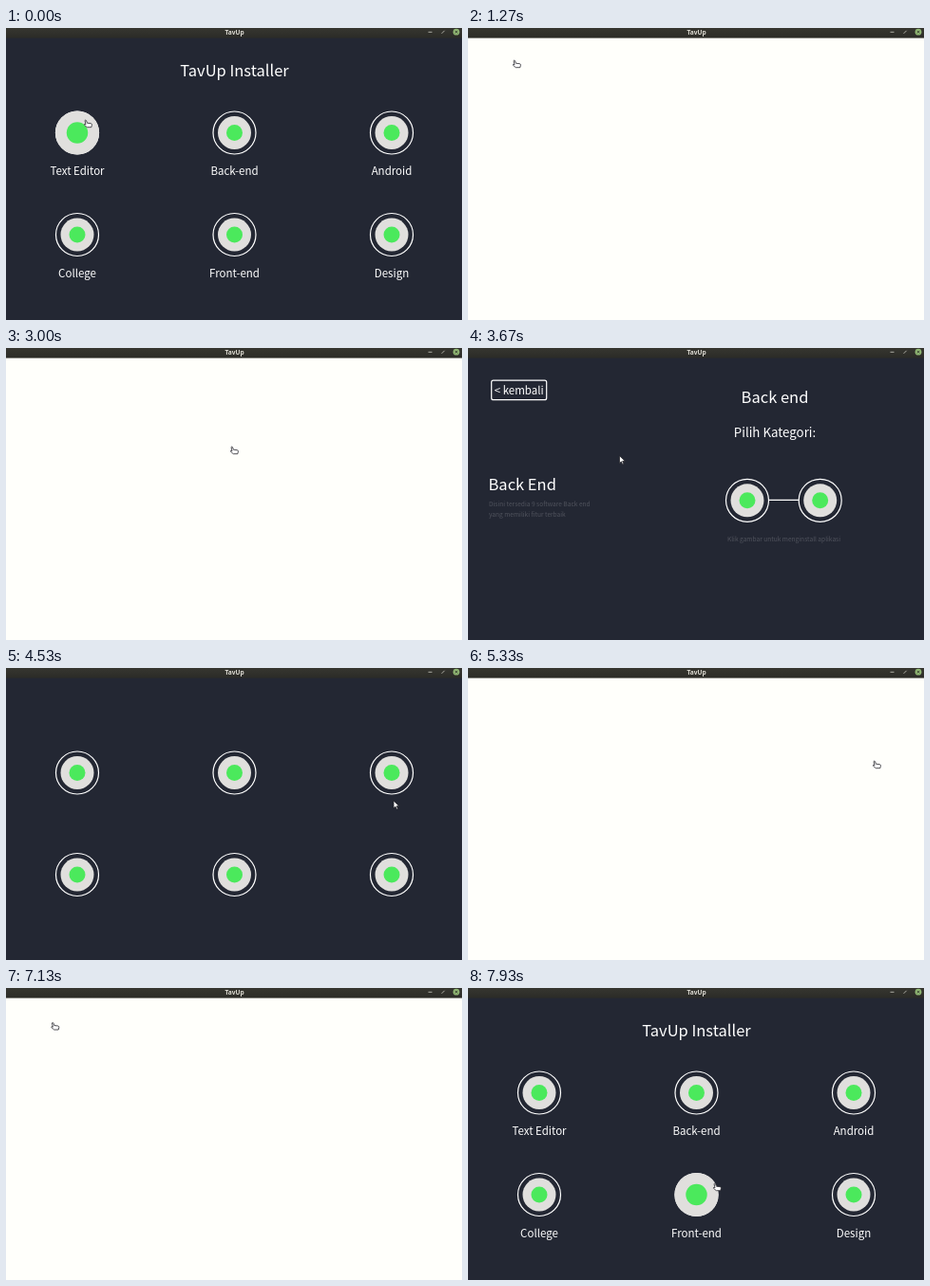
Animation of 480 by 308 pixels, one loop 8000 ms. Source, as an HTML page:

```html
<!DOCTYPE html>
<html lang="id">
<head>
<meta charset="utf-8">
<title>TavUp</title>
<style>
  html, body { margin: 0; width: 100%; height: 100%; overflow: hidden; background: #232733; }
  svg { display: block; width: 100%; height: 100%; }
  text { fill: #fff; font-family: "Noto Sans CJK JP", "Noto Sans CJK SC", "Noto Sans CJK", "Noto Sans", sans-serif; }
  .title { font-size: 16.5px; }
  .subtitle { font-size: 13.3px; }
  .label { font-size: 11.5px; }
  .small { font-size: 6.6px; fill: #50535d; }
  .mid { text-anchor: middle; }
  .bar { font: bold 6.6px "Noto Sans", sans-serif; fill: #dedcd4; }
  .line { fill: none; stroke: #fff; stroke-width: 1.2; }
  .cursor path { fill: #fff; stroke: #24242a; stroke-width: .8; stroke-linejoin: round; }
</style>
</head>
<body>
<svg viewBox="0 0 480 308">
  <defs>
    <linearGradient id="chrome" x2="0" y2="1">
      <stop offset="0" stop-color="#363630"/>
      <stop offset="1" stop-color="#2b2b27"/>
    </linearGradient>
  </defs>
  <rect id="paper" width="480" height="308"/>
  <g id="pages"></g>
  <rect width="480" height="10.6" fill="url(#chrome)"/>
  <text class="bar mid" x="240.5" y="7">TavUp</text>
  <path d="M444.5 4.3h4M458.6 5.8l3-3" stroke="#b9b8b0" stroke-width=".9"/>
  <circle cx="474" cy="4.2" r="3.4" fill="#8fb573"/>
  <path d="M472.7 2.9l2.6 2.6m0-2.6l-2.6 2.6" stroke="#30352a" stroke-width=".8"/>
  <g class="cursor" id="cursor">
    <path id="arrow" d="M0 0v8l1.9-1.8 1.3 2.9 1.3-.6-1.3-2.8h2.6z"/>
    <path id="hand" d="M0 .6q.8-1 1.5 0l.9 2.6 4 .5q1.2.3 1 1.6l-.6 2.4h-4.5l-3-2.6q0-1 1.2-.6l.5.3z"/>
  </g>
</svg>
<script>
const LOOP = 8000, FADE = 160;
const $ = id => document.getElementById(id);

function add(parent, tag, attrs, content) {
  const el = document.createElementNS('http://www.w3.org/2000/svg', tag);
  for (const key in attrs) el.setAttribute(key, attrs[key]);
  if (content) el.textContent = content;
  parent.append(el);
  return el;
}

function makePage() {
  const root = add($('pages'), 'g', {});
  return { root, shapes: add(root, 'g', {}), texts: add(root, 'g', {}), hotspots: [] };
}

const write = (page, cls, x, y, content) => add(page.texts, 'text', { class: cls, x, y }, content);

const MARKS = {
  leaf: [[17.5, '#e0dfdd'], [8.5, '#4be95c']],
  lime: [[17.5, '#74d64a']],
  blue: [[13.5, '#55b4f0']]
};

function addIcon(page, x, y, mark = 'leaf') {
  add(page.shapes, 'circle', { class: 'line', cx: x, cy: y, r: 22.5 });
  const el = add(page.shapes, 'g', {});
  for (const [r, fill] of MARKS[mark]) add(el, 'circle', { r, fill });
  page.hotspots.push({ parts: [el], x, y, w: 24, h: 24, growth: .32 });
}

function makeHome() {
  const page = makePage();
  write(page, 'title mid', 240.5, 51, 'TavUp Installer');
  ['Text Editor', 'Back-end', 'Android', 'College', 'Front-end', 'Design'].forEach((name, i) => {
    const x = 75 + 165.5 * (i % 3), y = 110.5 + 107.5 * Math.floor(i / 3);
    addIcon(page, x, y);
    write(page, 'label mid', x, y + 44.5, name);
  });
  return page;
}

function makeDetail({ name, heading, kind, count, top, rows, hintX }) {
  const page = makePage();
  const button = add(page.shapes, 'g', {});
  add(button, 'rect', { class: 'line', x: -29, y: -10.3, width: 58, height: 20.6, rx: 2 });
  const back = add(page.texts, 'g', {});
  add(back, 'text', { class: 'label mid', y: 4.3 }, '< kembali');
  page.hotspots.push({ parts: [button, back], x: 53.7, y: 44.4, w: 29, h: 11, growth: .1 });

  write(page, 'title', 21.5, 150, heading);
  write(page, 'small', 22, 166.5, `Disini tersedia ${count} software ${name}`);
  write(page, 'small', 22, 178, 'yang memiliki fitur terbaik');
  write(page, 'title mid', 323, top, name);
  write(page, 'subtitle mid', 323, top + 36.3, `Pilih ${kind}:`);
  rows.forEach(([left, right], i) => {
    const y = (rows.length > 1 ? 145.3 : 160.8) + 53.7 * i;
    add(page.shapes, 'path', { class: 'line', d: `M316.5 ${y - .5}h32` });
    addIcon(page, 294, y, left);
    addIcon(page, 370.7, y, right);
  });
  write(page, 'small mid', hintX, rows.length > 1 ? 238 : 204, 'Klik gambar untuk menginstall aplikasi');
  return page;
}

const home = makeHome();
const editor = makeDetail({
  name: 'Text Editor', heading: 'Text Editor', kind: 'Software', count: 4, top: 56,
  rows: [['leaf', 'leaf'], ['leaf', 'leaf']], hintX: 323
});
const backend = makeDetail({
  name: 'Back end', heading: 'Back End', kind: 'Kategori', count: 9, top: 58,
  rows: [['leaf', 'leaf']], hintX: 332.5
});
const android = makeDetail({
  name: 'Android', heading: 'Android', kind: 'Software', count: 3, top: 56,
  rows: [['lime', 'leaf'], ['leaf', 'blue']], hintX: 323
});
const pages = [home, editor, backend, android];

// start, page (null while loading), time its text appears
const scenes = [
  [0, home, 0], [600, null], [800, editor, 870], [1270, null],
  [2330, home, 2470], [3000, null], [3400, backend, 3470], [3930, null],
  [4470, home, 4600], [5070, null], [5530, android, 5600], [6930, null],
  [7400, home, 7530]
];

// time, x, y of the pointer tip
const route = [
  [0, 83, 97], [800, 83, 97], [1050, 48, 34], [1350, 48, 34],
  [2200, 195, 106], [2700, 237, 104], [3330, 237, 104], [3670, 160, 114],
  [3880, 48, 38], [4030, 48, 38], [4530, 408, 140], [4670, 411, 139],
  [4880, 427, 98], [5530, 427, 98], [5870, 380, 170], [6200, 383, 221],
  [6350, 383, 221], [6700, 48, 36], [7130, 48, 36], [7700, 266, 220],
  [7930, 259, 206], [LOOP, 259, 206]
];

function pointerAt(t) {
  const i = route.findIndex(stop => stop[0] > t);
  const [t0, x0, y0] = route[i - 1], [t1, x1, y1] = route[i];
  const k = (t - t0) / (t1 - t0);
  return [x0 + (x1 - x0) * k, y0 + (y1 - y0) * k];
}

function isOver(spot, [x, y]) {
  return Math.abs(x - spot.x) <= spot.w && Math.abs(y - spot.y) <= spot.h;
}

// share of the last moments spent over the hotspot
function hoverAmount(spot, t, start) {
  const samples = 8;
  let hits = 0;
  for (let i = 0; i < samples; i++) {
    hits += isOver(spot, pointerAt(Math.max(start, t - i * FADE / samples)));
  }
  return hits / samples;
}

const show = (el, on) => { el.style.display = on ? '' : 'none'; };

function render(t) {
  const [start, page, textStart] = scenes.filter(scene => scene[0] <= t).pop();
  const pointer = pointerAt(t);
  let pointing = !page && t - start < 300;

  $('paper').setAttribute('fill', page ? '#232733' : '#fffffb');
  for (const p of pages) show(p.root, p === page);
  if (page) {
    show(page.texts, t >= textStart);
    for (const spot of page.hotspots) {
      const scale = 1 + spot.growth * hoverAmount(spot, t, start);
      for (const part of spot.parts) {
        part.setAttribute('transform', `translate(${spot.x} ${spot.y}) scale(${scale})`);
      }
      pointing = pointing || isOver(spot, pointer);
    }
  }
  show($('hand'), pointing);
  show($('arrow'), !pointing);
  $('cursor').setAttribute('transform', `translate(${pointer})`);
}

function tick() {
  render(performance.now() % LOOP);
  requestAnimationFrame(tick);
}
tick();
</script>
</body>
</html>
```
